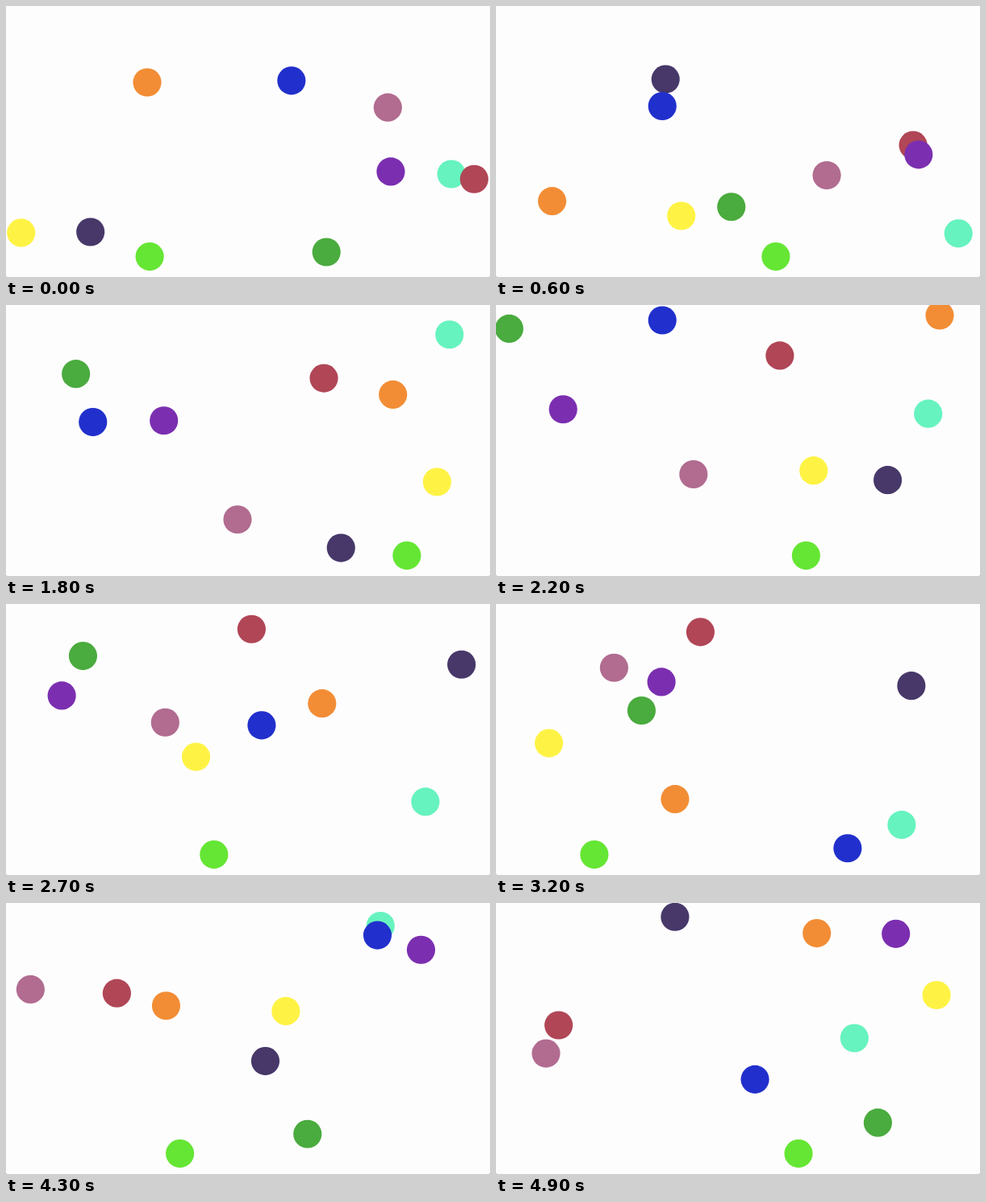
An HTML page with a canvas for the animation above (5000 ms loop, 600 by 337 pixels).

```html
<!DOCTYPE html>
<html lang="en">
<head>
<meta charset="utf-8">
<title>Bouncing balls</title>
<style>
  html, body { margin: 0; width: 100%; height: 100%; overflow: hidden; background: #fefdfe; }
  canvas { display: block; }
</style>
</head>
<body>
<canvas id="stage" width="600" height="337"></canvas>
<script>
const ctx = document.getElementById('stage').getContext('2d');
const SCALE = 600 / 1024, RADIUS = 30;
const LEFT = 29, RIGHT = 993, TOP = 28.3, BOTTOM = 544.5;
const FRAME = 100, LOOP = 5000;

// Each frame advances six steps, except these, which advance five.
const shortFrames = [11, 12, 25, 26, 27, 28, 46, 47];

// colour, x, y, step in x, step in y
const balls = [
  ['#66f3bf', 942.3, 356.7, 1, 7],
  ['#b04656', 990.5, 367.4, -3, -2],
  ['#f28d35', 298.7, 162.1, -10, 7],
  ['#b16c90', 807.8, 215.3, -3, 4],
  ['#7b2fb0', 814, 351.4, 8, -1],
  ['#fef344', 32, 481.4, 10, -1],
  ['#473869', 178.7, 479.5, 5, -9],
  ['#65e634', 304, 531.8, 8, 0],
  ['#4aab3e', 677.9, 522.2, -5, 4],
  ['#2130cc', 603.9, 158.4, -7, -9]
];

const stepsAt = frame => 6 * frame - shortFrames.filter(n => n <= frame).length;

// Walks along one axis, turning round after passing a limit.
function bounce(pos, step, min, max, count) {
  for (let i = 0; i < count; i++) {
    pos += step;
    if (pos < min || pos > max) step = -step;
  }
  return pos * SCALE;
}

function draw(frame) {
  const count = stepsAt(frame);
  ctx.fillStyle = '#fefdfe';
  ctx.fillRect(0, 0, 600, 337);
  ctx.fillStyle = '#bbb';
  ctx.fillRect(0, 336, 1, 1);
  ctx.fillRect(599, 336, 1, 1);
  for (const [colour, x, y, dx, dy] of balls) {
    ctx.fillStyle = colour;
    ctx.beginPath();
    ctx.arc(bounce(x, dx, LEFT, RIGHT, count), bounce(y, dy, TOP, BOTTOM, count),
      RADIUS * SCALE, 0, 2 * Math.PI);
    ctx.fill();
  }
}

const start = performance.now();
function tick() {
  const time = (performance.now() - start) % LOOP;
  draw(Math.floor(time / FRAME));
  requestAnimationFrame(tick);
}
tick();
</script>
</body>
</html>
```
